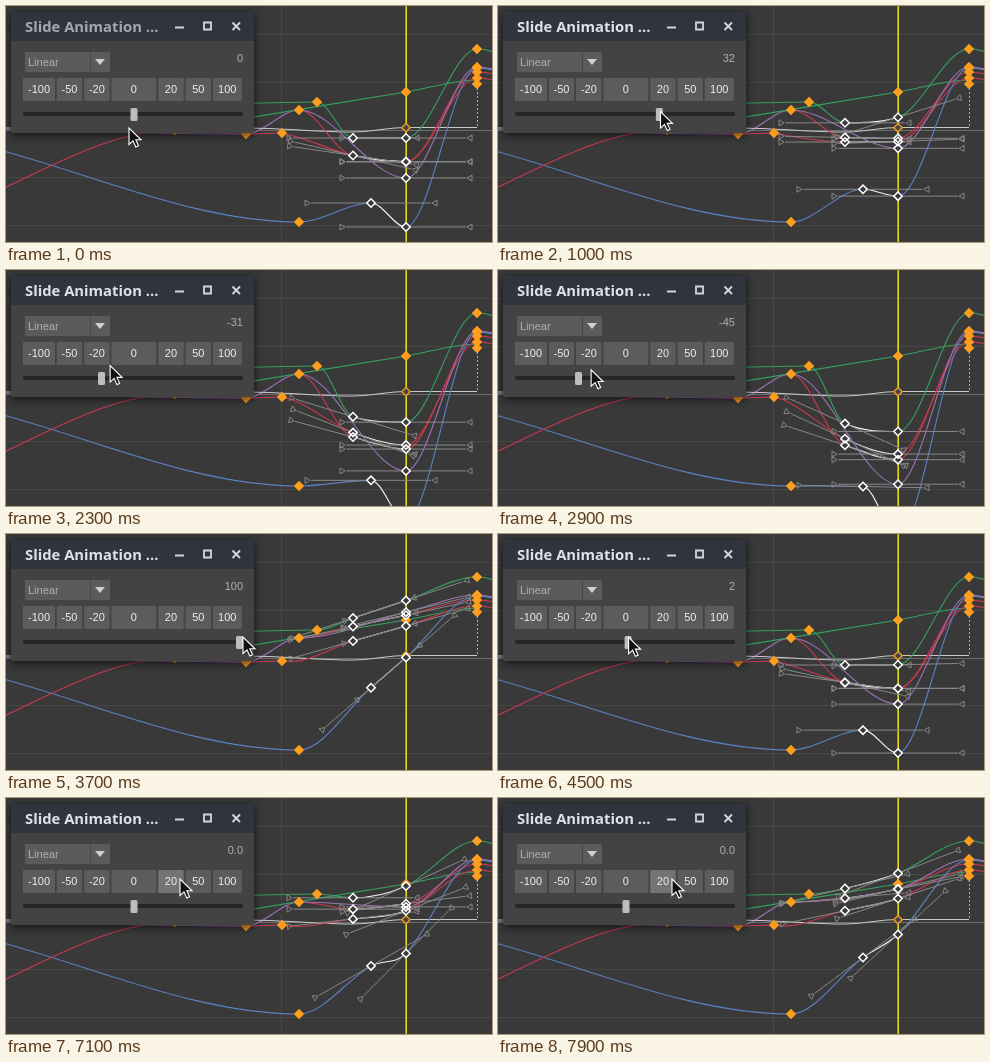
Recreate the animation shown at these times as an HTML page. Size 486 by 236 pixels, loop 8 s.

```html
<!DOCTYPE html>
<html lang="en">
<head>
<meta charset="utf-8">
<title>Slide Animation</title>
<style>
  html, body { margin: 0; width: 100%; height: 100%; overflow: hidden; background: #393939; }
  svg { display: block; width: 486px; height: 236px; }
  text { font: 11px "Liberation Sans", Arial, sans-serif; fill: #eee; }
  .title { font: 600 14.8px "Noto Sans", sans-serif; fill: #a4a8b0; }
  .active .title { fill: #dfe2e7; }
  .dim { fill: #b0b0b0; }
  .frame { fill: #434343; filter: drop-shadow(0 2px 4px rgba(0, 0, 0, .7)); }
  .curve { fill: none; stroke-width: 1.1; }
  .handle { fill: none; stroke: #878787; }
  .orange { fill: #ff9d1e; }
  .picked { fill: #393939; stroke: #fff; stroke-width: 1.5; }
  .btn rect { fill: #5c5c5c; }
  .btn.hover rect { fill: #747474; }
  .btn.down rect { fill: #4b4b4b; }
  .btn text { text-anchor: middle; }
</style>
</head>
<body>
<svg viewBox="0 0 486 236">
  <path id="grid" stroke="#484848"/>
  <path d="M0 124.5H486" stroke="#6c6c6c"/>
  <g id="curves" class="curve"></g>
  <path d="M471.5 78V121" stroke="#aaa" stroke-dasharray="2 2"/>
  <path d="M400.2 0V236" stroke="#f2e114" stroke-width="1.5"/>
  <path id="handles" class="handle"/>
  <path id="fixed" class="orange"/>
  <path id="hollow" fill="#444" stroke="#e69a22" stroke-width="1.5"/>
  <path id="picked" class="picked"/>

  <g id="panel">
    <rect class="frame" x="5" y="6" width="243" height="121" rx="2"/>
    <path d="M5 35V9Q5 6 8 6H245Q248 6 248 9V35Z" fill="#2f343f"/>
    <text class="title" x="19" y="26">Slide Animation ...</text>
    <path d="M169 21.5H178M198 16.5H205V23.5H198ZM226.500 16.500L234 24M234 16.500L226.500 24" fill="none" stroke="#d3d7dd" stroke-width="1.8"/>
    <rect x="19" y="46" width="85" height="20" rx="1" fill="#5b5b5b"/>
    <path d="M84.5 46V66" stroke="#494949"/>
    <path d="M89 53H99L94 59Z" fill="#d0d0d0"/>
    <text class="dim" x="22" y="60">Linear</text>
    <text id="value" class="dim" x="237" y="56" text-anchor="end"></text>
    <g id="buttons"></g>
    <rect x="17" y="106" width="220" height="4" rx="1" fill="#272727"/>
    <rect id="knob" x="-3.5" y="102" width="7" height="13" rx="1.5" fill="#bdbdbd"/>
  </g>
  <path id="cursor" d="M0 0V16.5L4 12.8L6.8 19L9.5 17.8L6.8 11.8H12Z" fill="#111" stroke="#fff" stroke-width="1.1"/>
</svg>
<script>
const NS = 'http://www.w3.org/2000/svg';
const $ = id => document.getElementById(id);
function add(parent, tag, attrs) {
  const el = document.createElementNS(NS, tag);
  for (const k in attrs) el.setAttribute(k, attrs[k]);
  return parent.appendChild(el);
}

const LOOP = 8000, STEP = 100, REACH = 64, MID = 128;
const DRAG = 700, DROP = 4400, ZERO = 5400, FIRST = 6200;
const RED = '#c9384f', GREEN = '#35a05c', BLUE = '#5b80c4', MAUVE = '#9a72b4', WHITE = '#f2f2f2';

// Inner keys of these are selected and slide towards the line between the ends.
const sliding = [
  { color: GREEN, keys: [[311, 96], [347, 132], [400, 132], [471, 43]] },
  { color: RED, keys: [[276, 127], [347, 149.5], [400, 155.5], [471, 72]], start: .2 },
  { color: RED, keys: [[293, 104], [347, 149.5], [400, 156], [471, 66]], limit: 1.2 },
  { color: MAUVE, keys: [[293, 104], [400, 172], [471, 61]] },
  { color: BLUE, keys: [[293, 216], [365, 197], [400, 221], [471, 62]] }
];
const still = [
  { color: BLUE, keys: [[-135, 124], [293, 216]] },
  { color: RED, keys: [[-135, 222], [169, 124], [240, 128], [276, 127]] },
  { color: MAUVE, keys: [[-135, 122], [240, 128], [293, 104]] },
  { color: GREEN, keys: [[200, 98], [311, 96]] },
  { color: GREEN, keys: [[169, 124], [400, 86], [471, 74]], start: -.17 },
  { color: '#c9c9c9', keys: [[0, 122], [240, 122], [347, 126], [400, 121.5], [471, 121.5]] }
];
const loose = [[169, 124], [240, 128], [400, 86], [471, 78]];

// Slider value by time, then the pointer where it is not dragging the knob.
const values = [[DRAG, 0], [1500, 100], [1600, 100], [2700, -87], [2900, -45], [3600, 100], [3700, 100], [DROP, 2]];
const pointer = [[0, 123, 122], [500, 127, 110], [DRAG, 128, 110], [1600, 239, 93], [3700, 236, 103],
  [DROP, 130, 104], [5200, 144, 89], [5700, 144, 89], [6000, 174, 81]];

let left = 17;
const buttons = Object.entries({ a: -100, b: -50, c: -20, d: 0, e: 20, f: 50, g: 100 }).map(([, n]) => {
  const width = n === 0 ? 45 : n === -100 ? 32 : n === 100 ? 29 : 25.5;
  const el = add($('buttons'), 'g', { class: 'btn' }), x = left;
  add(el, 'rect', { x, y: 72, width, height: 23, rx: 1 });
  add(el, 'text', { x: x + width / 2, y: 87 }).textContent = n;
  left += width + 1.8;
  return { el, x, width };
});

let grid = 'M275.5 0V236';
for (let y = 28.5; y < 236; y += 47.75) grid += `M0 ${Math.floor(y) + .5}H486`;
$('grid').setAttribute('d', grid);

const diamond = (x, y, r) => `M${x} ${y - r}l${r} ${r}l${-r} ${r}l${-r} ${-r}z`;
const ends = sliding.flatMap(c => [c.keys[0], c.keys.at(-1)]);
$('fixed').setAttribute('d', [...loose, ...ends].map(([x, y]) => diamond(x, y, 5.2)).join(''));
$('hollow').setAttribute('d', diamond(400, 121.7, 4.2));

const rise = (a, b) => (b[1] - a[1]) / (b[0] - a[0]);

// Smooth tangents through the neighbours, flat at peaks and valleys.
function slopes(p, { start = 0, limit = 3 }) {
  return p.map((_, i) => {
    if (i === 0) return start;
    if (i === p.length - 1) return 0;
    const s = rise(p[i - 1], p[i]), e = rise(p[i], p[i + 1]);
    if (s * e <= 0) return 0;
    const max = limit * Math.min(Math.abs(s), Math.abs(e));
    return Math.max(-max, Math.min(max, rise(p[i - 1], p[i + 1])));
  });
}

function segment([x0, y0], [x1, y1], m0, m1) {
  const d = (x1 - x0) / 3;
  return `M${x0} ${y0}C${x0 + d} ${y0 + d * m0} ${x1 - d} ${y1 - d * m1} ${x1} ${y1}`;
}

for (const c of still) {
  const m = slopes(c.keys, c);
  const d = c.keys.slice(1).map((k, i) => segment(c.keys[i], k, m[i], m[i + 1])).join('');
  add($('curves'), 'path', { d, stroke: c.color });
}
for (const c of sliding) {
  const n = c.keys.length - 1, [x, y] = c.keys[n];
  add($('curves'), 'path', { d: segment([x, y], [620, 124], 0, 0), stroke: c.color });
  c.paths = c.keys.slice(1).map((_, i) =>
    add($('curves'), 'path', { stroke: i > 0 && i < n - 1 ? WHITE : c.color }));
}

function sample(track, t) {
  const i = track.findIndex(p => p[0] > t);
  if (i === 0) return track[0].slice(1);
  if (i < 0) return track.at(-1).slice(1);
  const a = track[i - 1], b = track[i];
  const u = (t - a[0]) / (b[0] - a[0]), e = u * u * (3 - 2 * u);
  return a.slice(1).map((v, k) => v + (b[k + 1] - v) * e);
}

function arm(x, y, m, side) {
  const n = Math.hypot(1, m), ux = side / n, uy = side * m / n;
  const at = (d, w) => `${x + ux * d - uy * w} ${y + uy * d + ux * w}`;
  return `M${at(4, 0)}L${at(REACH - 4, 0)}` +
    `M${at(REACH - 3, 0)}L${at(REACH + 2, 3)}L${at(REACH + 2, -3)}Z`;
}

function drawCurves(mix) {
  let arms = '', marks = '';
  for (const c of sliding) {
    const last = c.keys.length - 1, a = c.keys[0], line = rise(a, c.keys[last]);
    const p = c.keys.map(([x, y], i) =>
      [x, i % last ? y + (a[1] + line * (x - a[0]) - y) * mix : y]);
    const m = slopes(p, c);
    c.paths.forEach((path, i) => path.setAttribute('d', segment(p[i], p[i + 1], m[i], m[i + 1])));
    for (let i = 1; i < last; i++) {
      const [x, y] = p[i];
      arms += arm(x, y, m[i], -1) + arm(x, y, m[i], 1);
      marks += diamond(x, y, 4.2);
    }
  }
  $('handles').setAttribute('d', arms);
  $('picked').setAttribute('d', marks);
}

function clicks(t) {
  if (t < FIRST) return 0;
  return 1 + Math.max(0, Math.floor((t - FIRST - 100) / 200));
}

function draw(t) {
  const slid = t < ZERO ? sample(values, t)[0] : 0;
  drawCurves(t < ZERO ? slid / 100 : 1 - .8 ** clicks(t));
  $('knob').setAttribute('transform', `translate(${MID + slid * 1.055} 0)`);
  $('value').textContent = t < ZERO ? Math.round(slid) : '0.0';
  $('panel').classList.toggle('active', t > DRAG);

  let [x, y] = sample(pointer, t);
  if (t > DRAG && t < DROP) x = MID + slid * (slid < 0 ? .775 : 1.09);
  $('cursor').setAttribute('transform', `translate(${x} ${y})`);

  const pressed = t === ZERO - 100 || t === FIRST - 100 || (t > FIRST && t % 200 === 0);
  for (const b of buttons) {
    const over = t > DROP && y < 95 && x >= b.x && x <= b.x + b.width;
    b.el.classList.toggle('hover', over);
    b.el.classList.toggle('down', over && pressed);
  }
}

const begin = performance.now();
let shown = -1;
function tick() {
  const t = Math.floor(((performance.now() - begin) % LOOP) / STEP) * STEP;
  if (t !== shown) draw(shown = t);
  requestAnimationFrame(tick);
}
tick();
</script>
</body>
</html>
```
